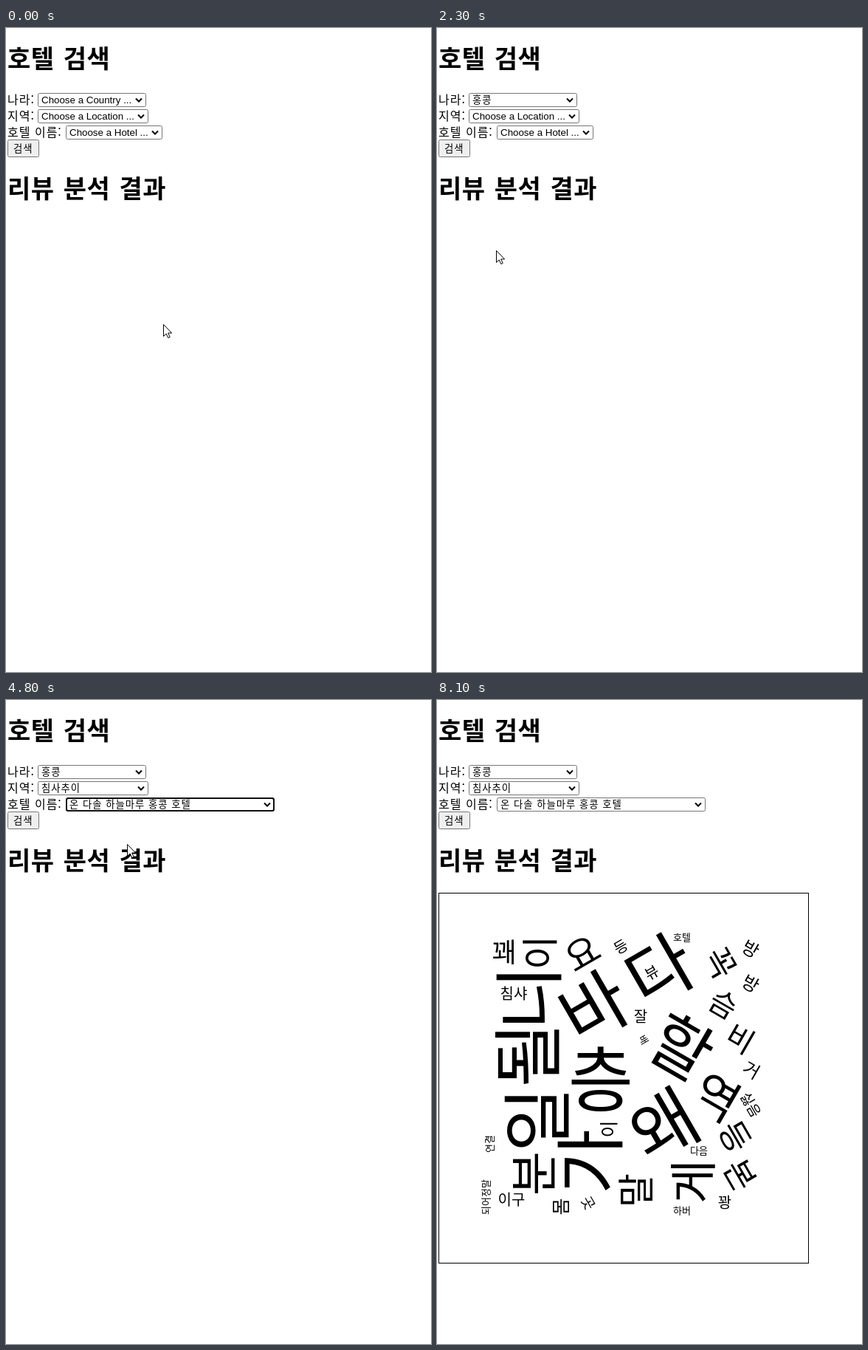
These frames come from a looping animation (576 by 872 pixels, 8.7 s). An HTML page:

```html
<!DOCTYPE html>
<html lang="ko">
<head>
<meta charset="utf-8">
<title>호텔 검색</title>
<style>
  html, body { margin: 0; width: 100%; height: 100%; overflow: hidden; background: #fff; }
  svg { display: block; }
  text { font-family: "Noto Sans CJK KR", "Noto Sans CJK JP", "Noto Sans CJK", sans-serif; white-space: pre; }
  .head { font-size: 34px; font-weight: 700; letter-spacing: .4px; word-spacing: 2.5px; }
  .label { font-size: 16px; letter-spacing: 1px; }
  .field { font-size: 13.333px; font-family: "Liberation Sans", Arial, "Noto Sans CJK KR", "Noto Sans CJK JP", sans-serif; }
  .ko { letter-spacing: 1px; }
  .box { fill: #fff; stroke: #767676; }
  .arrow { fill: none; stroke: #000; stroke-width: 2; }
  #button { fill: #efefef; stroke: #767676; }
  #button.hover { fill: #e5e5e5; stroke: #4f4f4f; }
  #cloud text { text-anchor: middle; }
</style>
</head>
<body>
<svg width="576" height="872" viewBox="0 0 576 872">
  <text class="head" x="2" y="54">호텔 검색</text>
  <text class="head" x="2" y="230">리뷰 분석 결과</text>
  <text class="label" x="2" y="102.5">나라:</text>
  <text class="label" x="2" y="124.5">지역:</text>
  <text class="label" x="2" y="146.5">호텔 이름:</text>
  <g id="selects"></g>
  <rect id="button" x="2.5" y="151.5" width="42" height="23" rx="2"/>
  <text class="field ko" x="10" y="168">검색</text>
  <g id="cloud">
    <rect x="2.5" y="261.5" width="501" height="501" fill="none" stroke="#000"/>
  </g>
  <path id="cursor" d="M.5 .5V16.5L4.2 13L6.8 18.6L9.2 17.5L6.7 12H11.6Z" fill="#fff" stroke="#000"/>
</svg>
<script>
const LOOP = 8700, STEP = 100;
const $ = id => document.getElementById(id);

function add(parent, tag, attrs) {
  const node = document.createElementNS("http://www.w3.org/2000/svg", tag);
  for (const key in attrs) node.setAttribute(key, attrs[key]);
  return parent.appendChild(node);
}

function makeSelect(x, y) {
  const box = add($("selects"), "rect", { class: "box", x: x + .5, y: y + .5, height: 18, rx: 2 });
  const text = add($("selects"), "text", { x: x + 5, y: y + 14 });
  const arrow = add($("selects"), "path", { class: "arrow", d: "M-4 -2L0 2L4 -2" });
  return (value, right) => {
    box.setAttribute("width", right - x - 1);
    text.textContent = value;
    text.setAttribute("class", value.startsWith("Choose") ? "field" : "field ko");
    arrow.setAttribute("transform", `translate(${right - 10} ${y + 9.5})`);
  };
}

const country = makeSelect(43, 88);
const region = makeSelect(43, 110);
const hotel = makeSelect(81, 132);
const ring = add($("selects"), "rect",
  { x: 82, y: 133, width: 281, height: 17, rx: 2.5, fill: "none", stroke: "#101010", "stroke-width": 2 });

// Words of one size and turn, each followed by its centre.
function addWords(size, turn, list) {
  for (const [, word, x, y] of list.matchAll(/(\S+) (\d+) (\d+)/g))
    add($("cloud"), "text", { y: size * .37, "font-size": size, transform: `translate(${x} ${y}) rotate(${turn})` })
      .textContent = word;
}
addWords(96, -90, "니 124 403 될 122 481 일 135 568 가 207 625");
addWords(96, -30, "다 302 366 바 213 416 왜 308 576");
addWords(96, 0, "층 222 513");
addWords(88, 30, "할 331 470");
addWords(65, -90, "분 131 641 게 347 652");
addWords(65, 30, "역 379 538");
addWords(50, -90, "이 139 342 말 269 664");
addWords(50, -30, "요 197 343");
addWords(44, 60, "꼭 384 356 등 404 591 본 411 643");
addWords(40, 30, "슴 388 412 비 411 459");
addWords(36, 0, "꽤 91 342");
addWords(25, -90, "이 233 581 몸 168 686");
addWords(24, 30, "방 425 337 방 425 384 거 426 501");
addWords(20, -30, "등 249 334 뷰 291 369");
addWords(20, 0, "침샤 104 398 잘 276 429 꽝 390 681 이구 101 677");
addWords(19, 60, "싫음 425 548 곳 205 681");
addWords(13, 0, "호텔 332 321 다음 355 610 하버 332 691");
addWords(13, -90, "연결 71 601 되어정말 66 673");
addWords(13, 60, "배 280 460");

// Cursor glides: start time, end time, x, y
const glides = [
  [100, 1000, 135, 116], [1000, 1400, 99, 296], [1400, 2000, 80, 310], [2200, 2900, 88, 139],
  [2900, 3100, 90, 178], [3200, 3900, 161, 143], [3900, 4700, 164, 195], [4700, 5300, 26, 162],
  [5500, 6100, 300, 184], [7900, 8000, 402, 656]
];
glides[7][0] = 4800;

function cursorAt(t) {
  let x = 213, y = 401;
  for (const [from, to, toX, toY] of glides) {
    const k = Math.min(1, Math.max(0, (t - from) / (to - from)));
    const eased = k * k * (3 - 2 * k);
    x += (toX - x) * eased;
    y += (toY - y) * eased;
  }
  return [Math.round(x), Math.round(y)];
}

const show = (node, on) => node.setAttribute("visibility", on ? "visible" : "hidden");

function draw(t) {
  country(t < 2300 ? "Choose a Country ..." : "홍콩", 190);
  region(t < 3600 ? "Choose a Location ..." : "침사추이", 193);
  hotel(t < 4300 ? "Choose a Hotel ..." : "온 다솔 하늘마루 홍콩 호텔", t < 3600 ? 212 : 364);
  show(ring, t >= 4300 && t < 5300);
  $("button").classList.toggle("hover", t >= 5200 && t < 7100);
  show($("cloud"), t >= 7100);
  show($("cursor"), t < 8100);
  $("cursor").setAttribute("transform", `translate(${cursorAt(t)})`);
}

const start = performance.now();
function tick() {
  const t = (performance.now() - start) % LOOP;
  draw(Math.floor(t / STEP) * STEP);
  requestAnimationFrame(tick);
}
tick();
</script>
</body>
</html>
```
